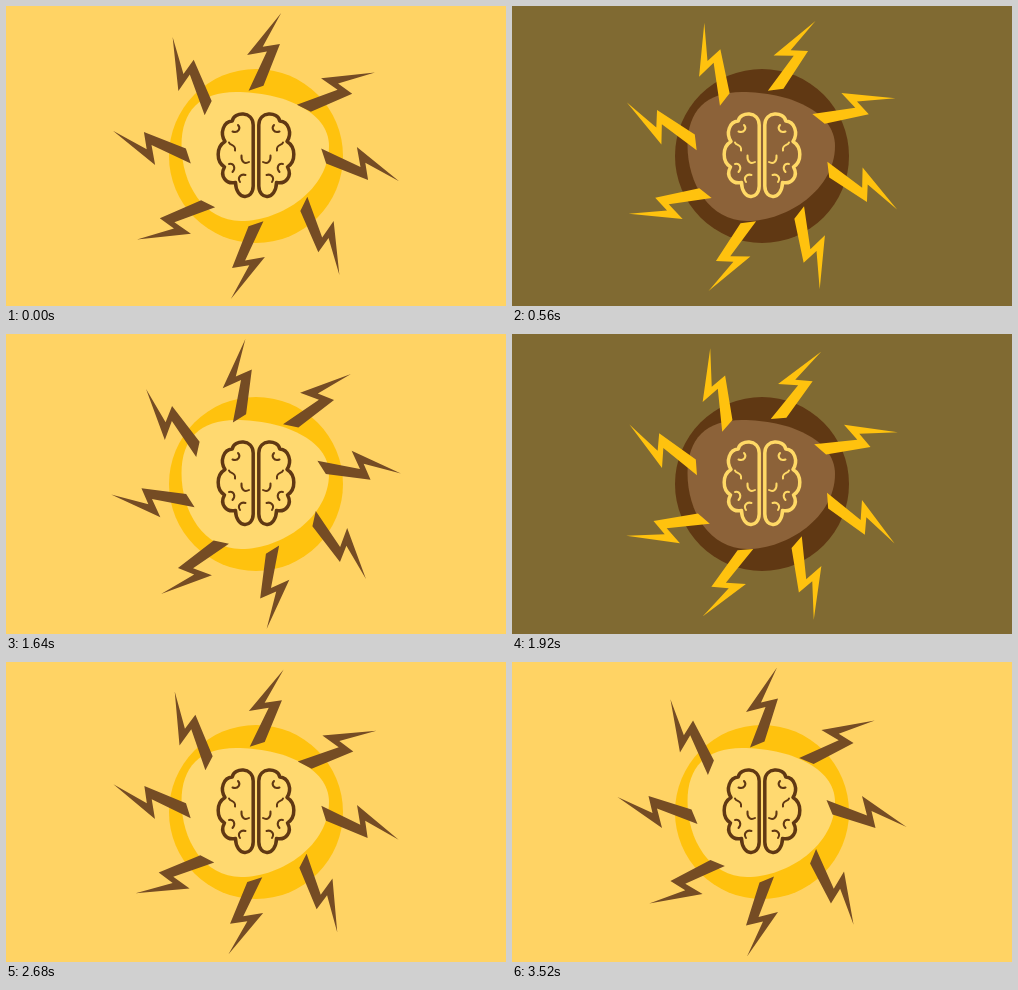
These frames come from a looping animation (500 by 300 pixels, 3600 ms). An HTML page:

```html
<!DOCTYPE html>
<html lang="en">
<head>
<meta charset="utf-8">
<title>Brain and lightning</title>
<style>
  html, body { margin: 0; width: 100%; height: 100%; overflow: hidden; }
  svg {
    display: block; width: 500px; height: 300px;
    --bg: #ffd364; --ring: #ffc20e; --blob: #ffd970; --line: #603813; --bolt: #754c24;
    background: var(--bg);
  }
  svg.dark { --bg: #806a32; --ring: #603813; --blob: #8c6239; --line: #ffd966; --bolt: #ffc20e; }
  .ring { fill: var(--ring); }
  .blob { fill: var(--blob); }
  #bolts { fill: var(--bolt); }
  .brain { fill: none; stroke: var(--line); stroke-linecap: round; stroke-linejoin: round; }
</style>
</head>
<body>
<svg id="stage" viewBox="0 0 500 300">
  <defs>
    <path id="bolt" d="M15 -144.500 L-16 -100 L3.500 -105 L-12 -64.500 L2.500 -70.500 L16 -113.500 L-1 -109.500Z"/>
    <g id="half">
      <path stroke-width="3.5" d="M247.200 119 C247 104.500 228 105.500 226.300 115 C217.500 115.500 213.500 127 219 135.500
        C210 141 210 155.500 218.500 161 C213.500 170 220 178.500 229.500 176.500 C230 194.500 247 194.500 247.200 180Z"/>
      <path stroke-width="2" d="M232 119 C235 122 232.500 127.500 226.500 125.500 M223 136.500 C224 140 230 138 229 144.500
        M235.500 149.500 C235 155.500 238.500 158.500 243 156 M223 158 C228 157 230 162 226.500 166
        M234 176 C231 171.500 235 167.500 239.500 169"/>
    </g>
  </defs>
  <circle class="ring" cx="250" cy="150" r="87"/>
  <path class="blob" d="M175.500 139 C175.500 105 194 86 230 86 C276 86 323 105 323 140
    C323 183 276 215 235 215 C198 215 175.500 178 175.500 139Z"/>
  <g class="brain">
    <use href="#half"/>
    <use href="#half" transform="translate(500) scale(-1 1)"/>
  </g>
  <g id="bolts"></g>
</svg>
<script>
  const STEP_MS = 40, LOOP_MS = 3600, STEPS = 89, FLIP_STEPS = 15, BOLTS = 8;
  const stage = document.getElementById('stage');
  const bolts = document.getElementById('bolts');

  for (let i = 0; i < BOLTS; i++) {
    const use = document.createElementNS('http://www.w3.org/2000/svg', 'use');
    use.setAttribute('href', '#bolt');
    use.setAttribute('transform', `rotate(${i * 360 / BOLTS})`);
    bolts.append(use);
  }

  function draw(now) {
    // The last step of the loop is held twice as long.
    const step = Math.min(Math.floor(now % LOOP_MS / STEP_MS), STEPS - 1);
    const turn = (step + 1) % STEPS;
    stage.classList.toggle('dark', Math.floor(turn / FLIP_STEPS) % 2 === 1);
    bolts.setAttribute('transform', `translate(250 150) rotate(${turn * 360 / STEPS})`);
  }

  const start = performance.now();
  function tick() {
    draw(performance.now() - start);
    requestAnimationFrame(tick);
  }
  tick();
</script>
</body>
</html>
```
